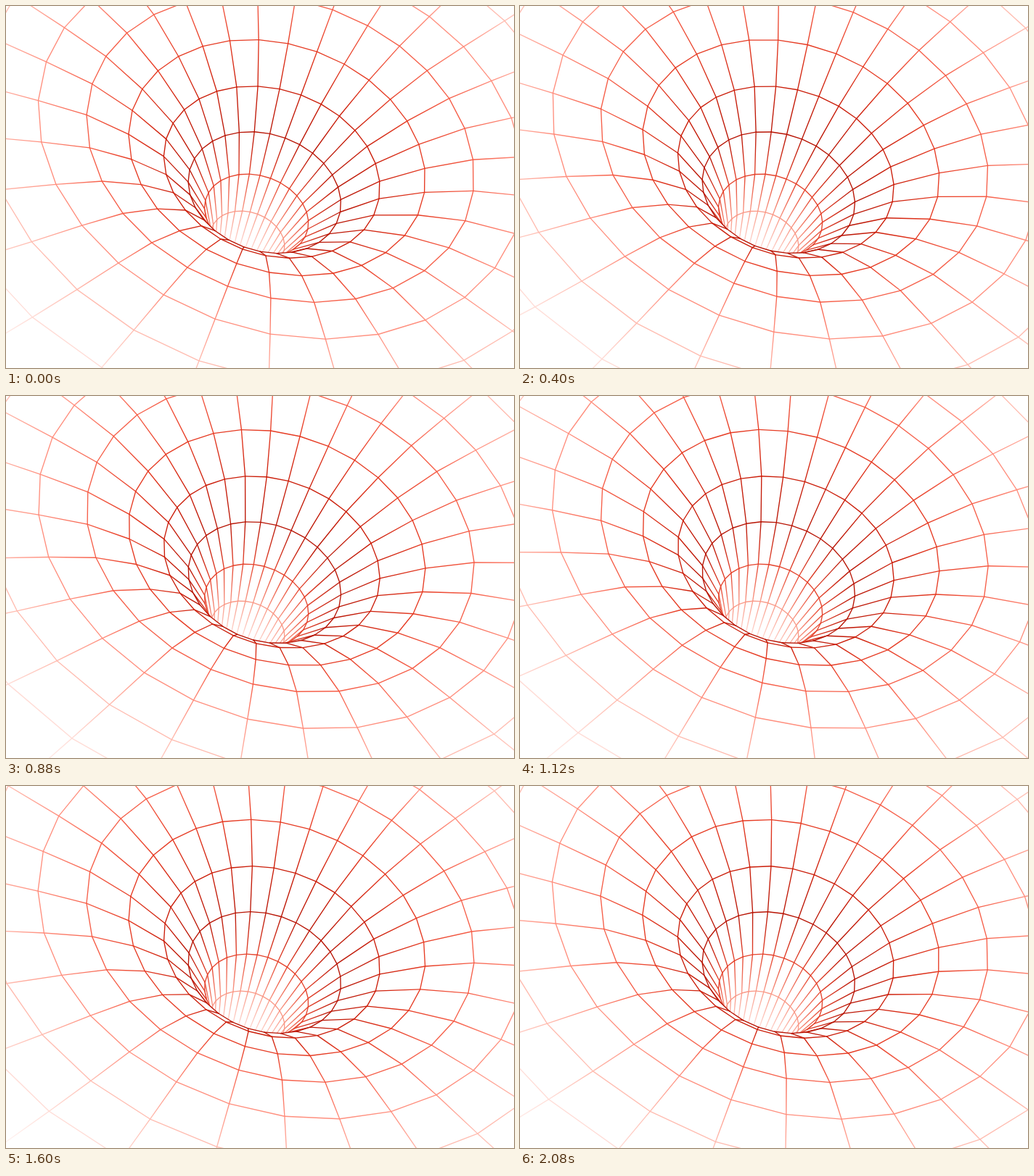
Recreate the animation shown at these times as an HTML page with a canvas. Size 700 by 500 pixels, loop 2.16 s.

```html
<!DOCTYPE html>
<html>
<head>
<meta charset="utf-8">
<title>Funnel</title>
<style>
html, body { margin: 0; width: 100%; height: 100%; overflow: hidden; background: #fff; }
canvas { display: block; }
</style>
</head>
<body>
<canvas id="stage" width="700" height="500"></canvas>
<script>
const ctx = document.getElementById('stage').getContext('2d');
const LOOP = 2160, STEP = 80, SPOKES = 30;
const TILT = 19.5 * Math.PI / 180, COS = Math.cos(TILT), SIN = Math.sin(TILT);
const FLATTEN = 0.745, PERSPECTIVE = 0.00027;

// From the throat outwards: half width, centre along the tilted axis, colour
const rings = [
  [30, 160, '#ffffff'],
  [39, 118, '#ffded8'],
  [52.4, 78.4, '#f99a88'],
  [73.5, 41.6, '#e5432c'],
  [108, 8.1, '#b81404'],
  [152.8, -21.8, '#cb1d09'],
  [209.8, -43, '#e63b23'],
  [274, -57, '#f65f49'],
  [343.8, -60.6, '#ff8f7e'],
  [426, -60, '#ffbcb0'],
  [512, -58, '#ffdcd6'],
  [610, -54, '#fff6f4']
];

// Angle 0 is the point of the ring nearest to the viewer
function project([size, centre], angle) {
  const q = size * PERSPECTIVE;
  const k = Math.sqrt((1 - q) / (1 + q));
  const a = 2 * Math.atan2(Math.sin(angle / 2), k * Math.cos(angle / 2));
  const u = size * Math.sin(a);
  const v = centre + FLATTEN * size * Math.cos(a);
  return [359 + u * COS - v * SIN, 250 + u * SIN + v * COS];
}

function facesViewer(corners) {
  let area = 0;
  corners.forEach(([x, y], i) => {
    const [nx, ny] = corners[(i + 1) % 4];
    area += x * ny - nx * y;
  });
  return area < 0;
}

function line(p, q, style) {
  ctx.strokeStyle = style;
  ctx.beginPath();
  ctx.moveTo(...p);
  ctx.lineTo(...q);
  ctx.stroke();
}

function blend(p, q, from, to) {
  const g = ctx.createLinearGradient(...p, ...q);
  g.addColorStop(0, from);
  g.addColorStop(1, to);
  return g;
}

function draw(turn) {
  ctx.fillStyle = '#fff';
  ctx.fillRect(0, 0, 700, 500);
  ctx.lineWidth = 1.35;
  ctx.lineCap = 'round';

  const step = 2 * Math.PI / SPOKES;
  const points = rings.map(ring => Array.from({ length: SPOKES },
    (_, j) => project(ring, (j - turn - 0.075) * step)));

  // Outer bands cover the deeper ones behind the near lip
  for (let i = 0; i < rings.length - 1; i++) {
    const inner = points[i], outer = points[i + 1];
    const next = j => (j + 1) % SPOKES;
    const visible = inner.map((p, j) =>
      facesViewer([p, outer[j], outer[next(j)], inner[next(j)]]));

    ctx.fillStyle = '#fff';
    inner.forEach((p, j) => {
      if (!visible[j]) return;
      ctx.beginPath();
      ctx.moveTo(...p);
      ctx.lineTo(...outer[j]);
      ctx.lineTo(...outer[next(j)]);
      ctx.lineTo(...inner[next(j)]);
      ctx.fill();
    });

    const from = rings[i][2], to = rings[i + 1][2];
    inner.forEach((p, j) => {
      if (visible[j]) line(p, inner[next(j)], from);
      if (visible[j] || visible[(j + SPOKES - 1) % SPOKES])
        line(p, outer[j], blend(p, outer[j], from, to));
    });
  }
}

const start = performance.now();
function tick() {
  const t = (performance.now() - start) % LOOP;
  draw(Math.floor(t / STEP) * STEP / LOOP);
  requestAnimationFrame(tick);
}
tick();
</script>
</body>
</html>
```
